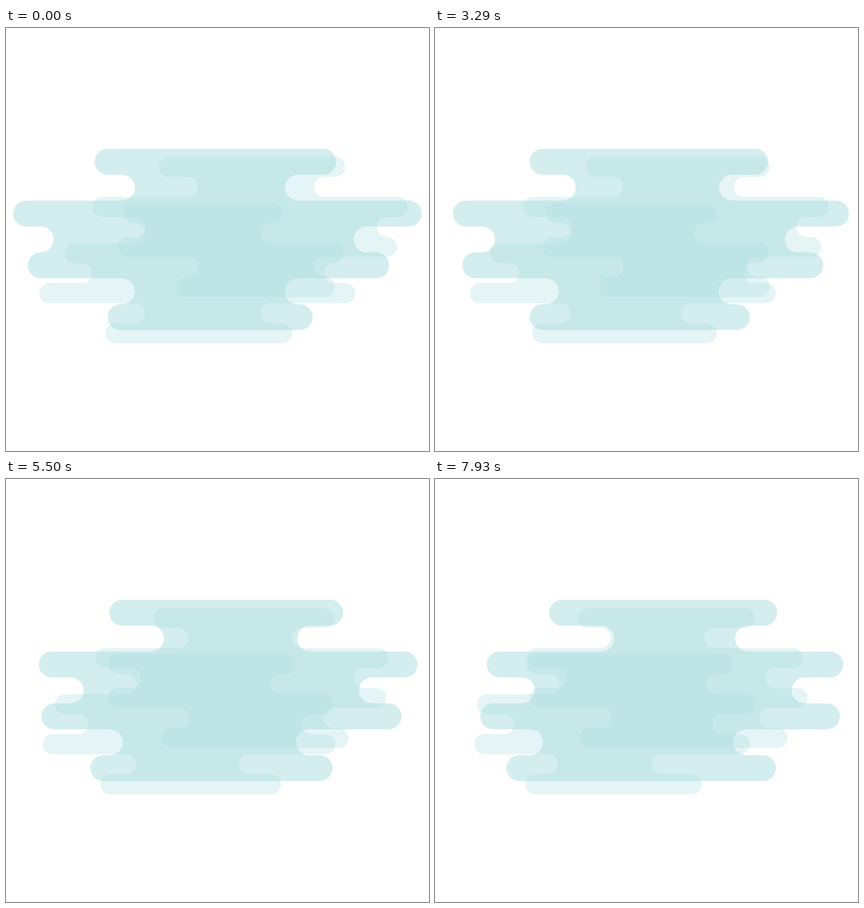
Animation of 640x640 px, one loop 8 s. Source, as an HTML page:

```html
<!DOCTYPE html>
<html lang="en">
<head>
<meta charset="utf-8">
<title>Drifting cloud</title>
<style>
  html, body { margin: 0; width: 100%; height: 100%; overflow: hidden; background: #fff; }
  svg { display: block; width: 100%; height: 100%; }
  use { fill: rgb(169, 219, 221); }
  .small { fill-opacity: 0.3; }
  .large { fill-opacity: 0.5; }
</style>
</head>
<body>
<svg viewBox="0 0 640 640">
  <defs><path id="cloud"/></defs>
  <!-- One cloud, shown upright, mirrored and turned by half a circle. -->
  <use href="#cloud" class="large" transform="translate(0 182.7)"/>
  <use href="#cloud" class="small" transform="translate(616.8 195) scale(-.773 .773)"/>
  <use href="#cloud" class="small" transform="translate(536.8 477) scale(-.773)"/>
</svg>
<script>
const LOOP = 8000;
const EASE_TIME = 13500; // the loop shows the first part of a longer ease
const STEP = 39.2;
const RADIUS = STEP / 2;

// Key poses of each side, top to bottom, alternating bar ends and notch tips.
const left = {
  from: [134, 195, 11, 72, 33, 195, 154],
  to: [173, 272, 79, 152, 69, 163, 107.5]
};
const right = {
  from: [499.5, 422, 629, 526, 579.5, 422, 464],
  to: [518, 454.5, 617.5, 540, 613, 451.5, 516.5]
};

const smooth = s => s * s * (3 - 2 * s);

// Half-circle caps along one side: out for bars, in for notches.
function caps({ from, to }, p, side) {
  return from.map((x, i) => {
    const isBar = i % 2 === 0;
    const cx = x + (to[i] - x) * p + (isBar ? -side : side) * RADIUS;
    const y = (side > 0 ? i : i + 1) * STEP;
    return `L${cx} ${y}a${RADIUS} ${RADIUS} 0 0 ${+isBar} 0 ${side * STEP}`;
  });
}

function outline(p) {
  const sides = [...caps(right, p, 1), ...caps(left, p, -1).reverse()];
  return 'M' + sides.join('').slice(1) + 'Z';
}

const cloud = document.getElementById('cloud');
const start = performance.now();

function draw(now) {
  const time = Math.max(0, now - start) % LOOP;
  const p = smooth(time / EASE_TIME) / smooth(LOOP / EASE_TIME);
  cloud.setAttribute('d', outline(p));
  requestAnimationFrame(draw);
}
draw(start);
</script>
</body>
</html>
```
